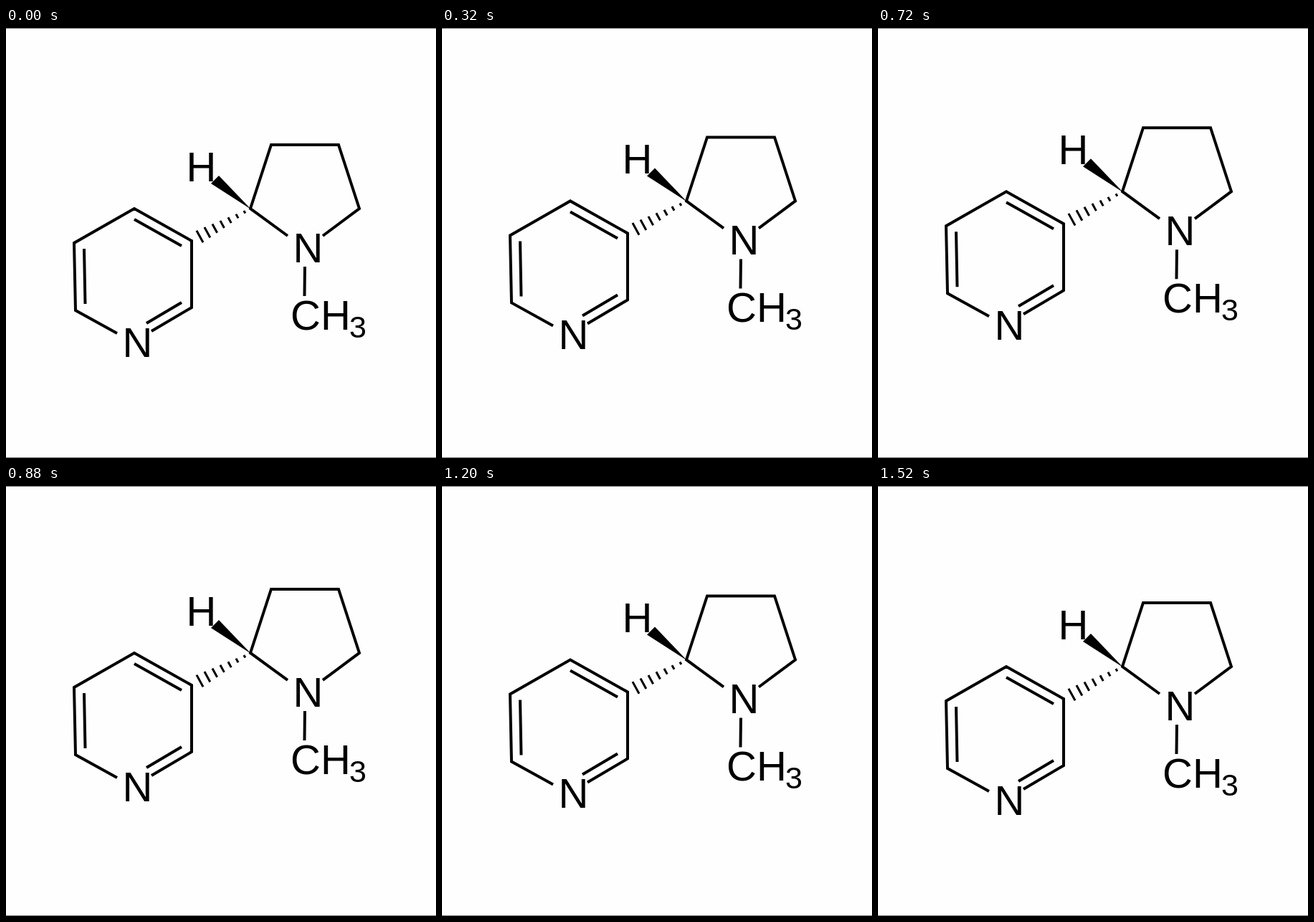
These frames come from a looping animation (600x600 px, 1.6 s). An HTML page:

```html
<!DOCTYPE html>
<html lang="en">
<head>
<meta charset="utf-8">
<style>
  html, body { margin: 0; height: 100%; overflow: hidden; background: #fefefe; }
  svg { display: block; width: 100vw; height: 100vh; }
  text { font: 58px "Liberation Sans", Arial, sans-serif; }
  .sub { font-size: 43px; }
  .bonds { fill: none; stroke: #000; stroke-width: 4; }
</style>
</head>
<body>
<svg viewBox="0 0 600 600">
  <path d="M0 .5H600M0 599.5H600" stroke="#777"/>
  <g id="molecule">
    <g class="bonds">
      <path d="M155 426L97 394L95 300L179 252L259 297V390L203 423"/>
      <path d="M109 308L110.5 385M179 267L245 304M245 383L196 412"/>
      <path d="M393 290L341 252L370 163H464L493 252L442 290"/>
      <path d="M417 333L416.5 374"/>
      <path id="hash" stroke-width="3"/>
    </g>
    <path d="M342 253L286 217L297 206Z"/>
    <text x="251.5" y="214">H</text>
    <text x="400.5" y="327">N</text>
    <text x="162.5" y="459">N</text>
    <text x="397" y="421">CH</text>
    <text class="sub" x="479" y="432">3</text>
  </g>
</svg>
<script>
  const LOOP = 1600, STEP = 80, RISE = 9, FALL = 10, HEIGHT = 23.8;
  const molecule = document.getElementById("molecule");

  // Hashed bond: bars across the bond axis, shrinking towards the ring
  let bars = "";
  for (let i = 0; i < 7; i++) {
    const x = 270.5 + 10.4 * i, y = 291 - 5.7 * i, half = 9.5 - 1.25 * i;
    const dx = 0.48 * half, dy = 0.877 * half;
    bars += `M${x - dx} ${y - dy}L${x + dx} ${y + dy}`;
  }
  document.getElementById("hash").setAttribute("d", bars);

  // Steady climb, then a slightly slower descent, in discrete steps
  function draw(now) {
    const step = Math.floor((now % LOOP) / STEP);
    const lift = Math.max(0, Math.min(step / RISE, (RISE + FALL - step) / FALL));
    molecule.setAttribute("transform", `translate(0 ${-HEIGHT * lift})`);
  }

  const start = performance.now();
  function tick() {
    draw(performance.now() - start);
    requestAnimationFrame(tick);
  }
  tick();
</script>
</body>
</html>
```
